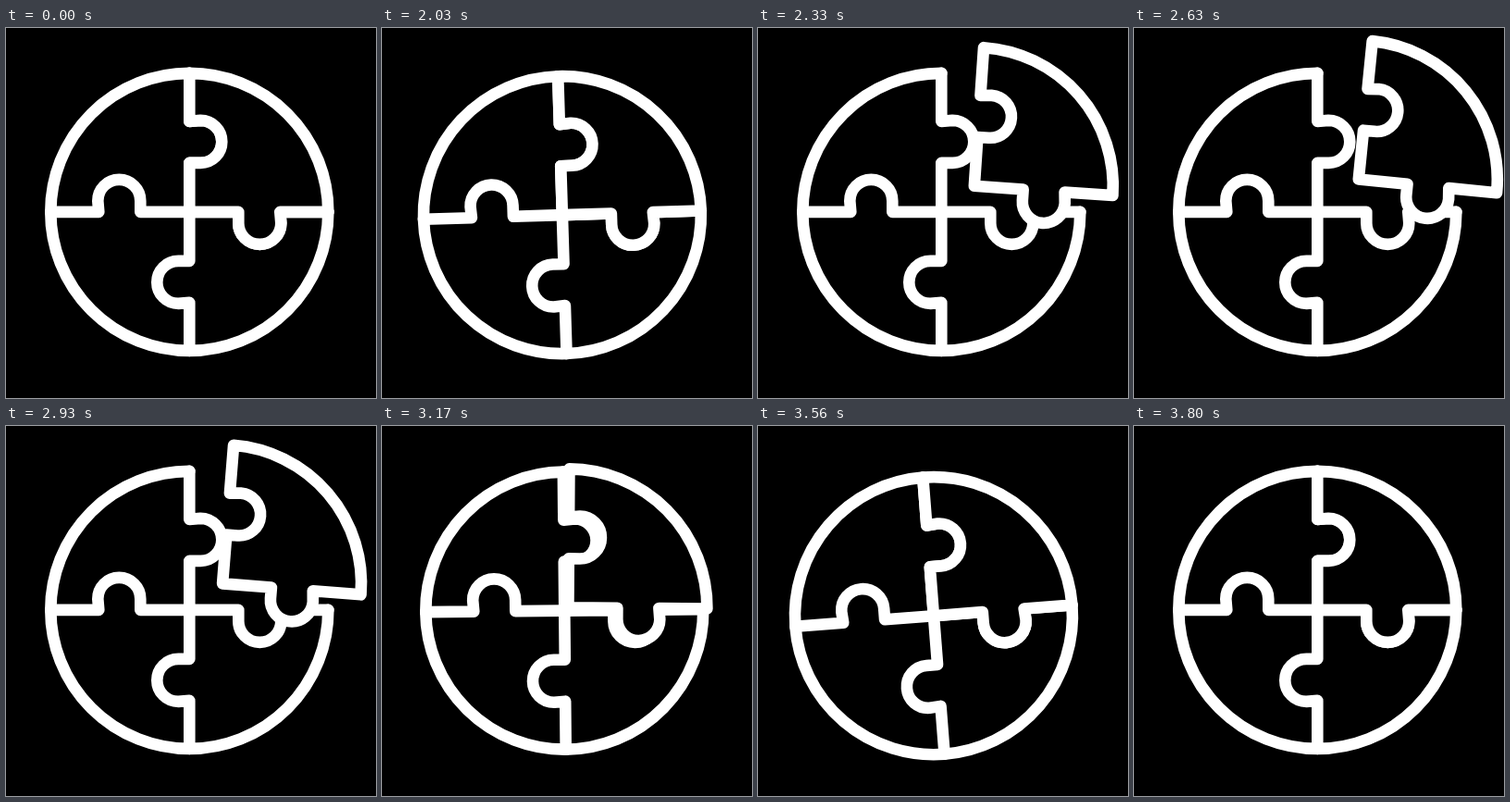
An HTML page that plays this animation: 400 px wide and 400 px high, repeating every 3830 ms.

```html
<!DOCTYPE html>
<html lang="en">
<head>
<meta charset="utf-8">
<title>Puzzle</title>
<style>
  html, body { margin: 0; height: 100%; overflow: hidden; background: #000; }
  svg { display: block; width: 100%; height: 100%; }
</style>
</head>
<body>
<svg viewBox="0 0 400 400" fill="none" stroke="#fff" stroke-width="12.6" stroke-linecap="round" stroke-linejoin="round">
  <defs>
    <path id="edge" d="M0-150V-98L12-99A23 23 0 0 1 12-53H0V0"/>
  </defs>
  <g id="body">
    <path d="M150 0A150 150 0 1 1 0-150"/>
    <use href="#edge"/>
    <use href="#edge" transform="rotate(90)"/>
    <use href="#edge" transform="rotate(180)"/>
    <use href="#edge" transform="rotate(270)"/>
  </g>
  <path id="piece" fill="#000" d="M0-150A150 150 0 0 1 150 0H98L99 12A23 23 0 0 1 53 12V0H0V-53H12A23 23 0 0 0 12-99L0-98Z"/>
</svg>
<script>
  const LOOP = 3830, STEP = 30;
  const body = document.getElementById('body');
  const piece = document.getElementById('piece');

  // A pose is [x, y, degrees] relative to the resting place.
  const REST = [0, 0, 0];
  const WINDUP = [-10, 9.5, -5.2];
  const OUT = [44.5, -35.5, 5.7];
  const RECOIL = [-18, 13.5, -9.6];

  const mix = (a, b, k) => a.map((v, i) => v + (b[i] - v) * k);
  const part = (t, from, to) => Math.min(1, Math.max(0, (t - from) / (to - from)));
  const easeOut = (u, power) => 1 - (1 - u) ** power;
  const sine = u => Math.sin(u * Math.PI / 2);
  const swing = u => (1 - Math.cos(u * Math.PI)) / 2;

  function bodyPose(t) {
    if (t < 2135) return mix(REST, WINDUP, sine(part(t, 2000, 2135)));
    if (t < 3164) return mix(WINDUP, REST, easeOut(part(t, 2135, 2320), 3));
    if (t < 3330) return mix(REST, RECOIL, sine(part(t, 3164, 3330)));
    return mix(RECOIL, REST, swing(part(t, 3330, 3770)));
  }

  function piecePose(t) {
    if (t < 2135 || t >= 3185) return bodyPose(t);
    if (t < 2630) return mix(WINDUP, OUT, easeOut(part(t, 2135, 2630), 3.6));
    return mix(OUT, REST, part(t, 2630, 3185) ** 2.65);
  }

  function place(el, [x, y, angle]) {
    el.setAttribute('transform', `translate(${198.3 + x} ${198.9 + y}) rotate(${angle})`);
  }

  const start = performance.now();
  function draw() {
    const time = (performance.now() - start) % LOOP;
    const t = Math.floor((time + 10) / STEP) * STEP - 10;
    place(body, bodyPose(t));
    place(piece, piecePose(t));
    requestAnimationFrame(draw);
  }
  draw();
</script>
</body>
</html>
```
